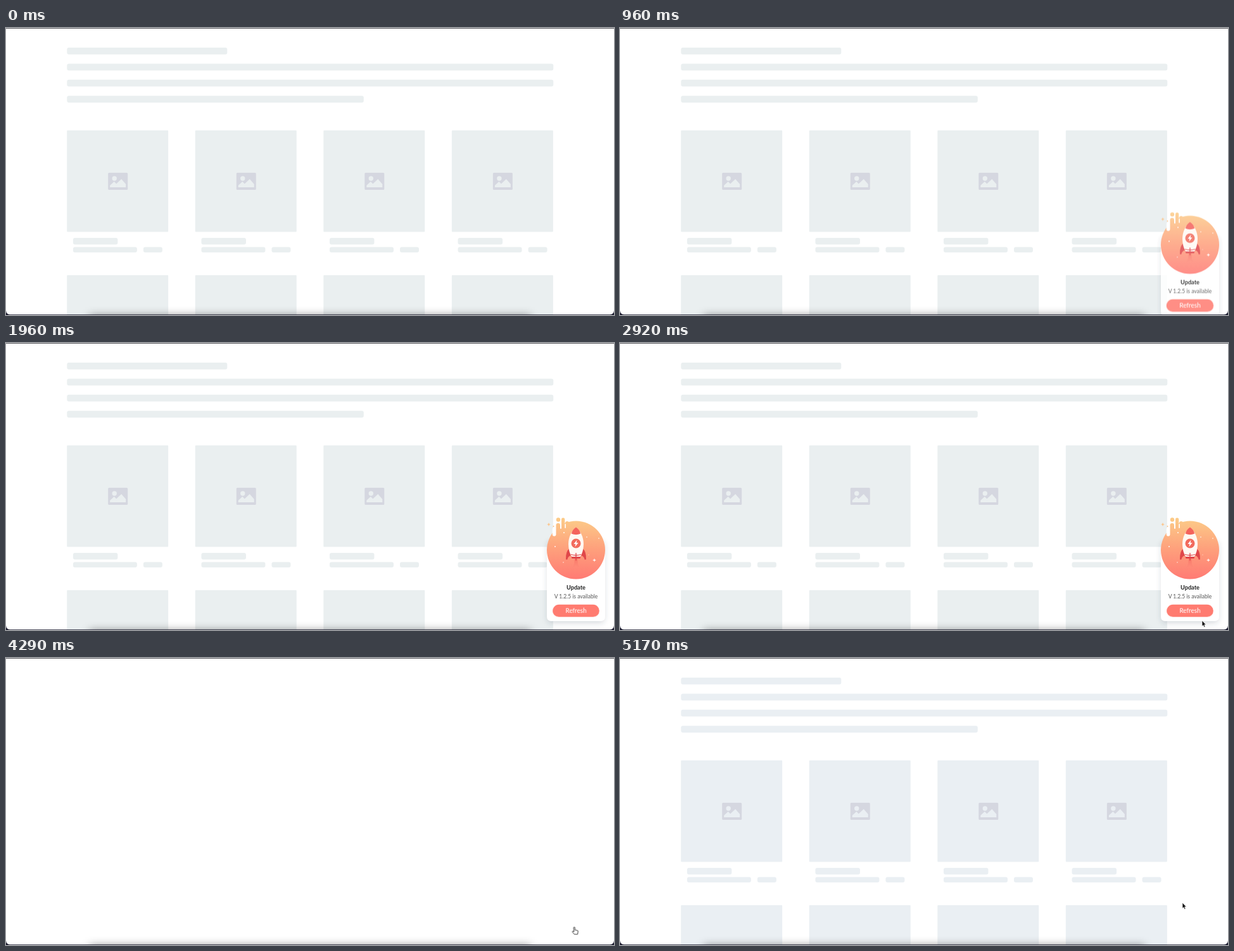
Recreate the animation shown at these times as an HTML page. Size 960 by 454 pixels, loop 5630 ms.

```html
<!DOCTYPE html>
<html lang="en">
<head>
<meta charset="utf-8">
<title>Update prompt</title>
<style>
  html, body { margin: 0; width: 100%; height: 100%; overflow: hidden; background: #fff; }
  svg { display: block; width: 960px; height: 454px; }
  text { font-family: Lato, "Open Sans", sans-serif; text-anchor: middle; }
  #button { transform-origin: 900px 423.5px; }
</style>
</head>
<body>
<svg viewBox="0 0 960 454">
  <defs>
    <linearGradient id="sunset" gradientUnits="userSpaceOnUse" x1="0" y1="278" x2="0" y2="373">
      <stop offset="0" stop-color="#fccb88"/>
      <stop offset=".5" stop-color="#fea07c"/>
      <stop offset="1" stop-color="#ff7b74"/>
    </linearGradient>
    <linearGradient id="flame" x1="0" y1="0" x2="0" y2="1">
      <stop offset="0" stop-color="#f0544f"/>
      <stop offset="1" stop-color="#ff8f80" stop-opacity=".2"/>
    </linearGradient>
    <filter id="soft" x="-20%" y="-200%" width="140%" height="500%"><feGaussianBlur stdDeviation="7"/></filter>
    <filter id="lift" x="-30%" y="-30%" width="160%" height="160%"><feGaussianBlur stdDeviation="4"/></filter>
    <g id="picture">
      <rect x="65" y="67" width="31" height="27" rx="1.5" fill="#d5d7e0"/>
      <circle cx="75" cy="76" r="3.7"/>
      <path d="M68 90V87L74.5 81 78 84.5 86 77 93 85V90Z"/>
    </g>
  </defs>

  <rect width="960" height="454" fill="#fff"/>
  <g id="skeleton"></g>
  <rect x="132" y="455" width="696" height="22" fill="#000" fill-opacity=".48" filter="url(#soft)"/>

  <g id="card">
    <rect x="855" y="314" width="90" height="129" rx="7" fill="#3c4654" fill-opacity=".2" filter="url(#lift)"/>
    <path d="M854 327H946V433Q946 440 939 440H861Q854 440 854 433Z" fill="#fff"/>

    <g fill="url(#sunset)">
      <circle cx="900" cy="327.5" r="46"/>
      <circle cx="872" cy="279.5" r="3.2"/>
      <rect x="868.5" y="285" width="6.5" height="18" rx="3.2"/>
      <rect x="877" y="276.5" width="5.3" height="24" rx="2.6"/>
      <rect x="883" y="282" width="6" height="16" rx="3"/>
      <path d="M857 284L857.8 286.2 860 287 857.8 287.8 857 290 856.2 287.8 854 287 856.2 286.2Z"/>
      <circle cx="864.5" cy="290" r="1"/>
    </g>
    <g fill="#fff">
      <rect x="862.8" y="292" width="5.7" height="13.5" rx="2.8"/>
      <rect x="875" y="283" width="2" height="11" rx="1"/>
      <rect x="882.3" y="286" width="1.6" height="7" rx=".8"/>
    </g>
    <g id="stars" fill="#fff"></g>

    <path d="M898 340H902L903 350 907 358 900 352 893 358 897 350Z" fill="url(#flame)" opacity=".55"/>
    <g fill="#e0474a">
      <path id="fin" d="M890 325Q883.5 329 884 342.5H886.5Q887 337.5 892 336Z"/>
      <use href="#fin" transform="matrix(-1 0 0 1 1800 0)"/>
      <path d="M892 335H908L906.5 341H893.5Z"/>
    </g>
    <path d="M900 292C907 297 912 307 912 318Q912 329 907 338H893Q888 329 888 318C888 307 893 297 900 292Z" fill="#fff8f2"/>
    <path d="M900 291.5Q905.5 295 907.3 301.5Q900 305 892.7 301.5Q894.5 295 900 291.5Z" fill="#f4625c"/>
    <circle cx="900" cy="317" r="7.5" fill="#f26b5c"/>
    <path d="M901.6 311.5L896.4 318H899.4L898.4 322.5 903.6 316H900.6Z" fill="#fff"/>
    <path d="M892 334.5Q900 337 908 334.5M900 332V344" stroke="#e0474a" stroke-width="1.3" fill="none"/>

    <text x="900" y="390" font-size="9.2" font-weight="700" fill="#222">Update</text>
    <text x="900" y="404" font-size="8.5" fill="#555">V 1.2.5 is available</text>
    <g id="button">
      <rect x="863" y="413.8" width="74" height="19.6" rx="9.8" fill="#ff7b70"/>
      <text x="900" y="427" font-size="10" font-weight="500" fill="#fff">Refresh</text>
    </g>
  </g>

  <g id="cursor" stroke-linejoin="round">
    <path id="arrow" d="M0 0V9.2L2 7.4 3.4 10.4 5 9.7 3.6 6.8H6.3Z" fill="#111" stroke="#fff" stroke-width=".7"/>
    <path id="hand" d="M-1.1 1A1.1 1.1 0 0 1 1.1 1V4.4L5 5.2Q6.2 5.6 6 7L5.2 11.2H0L-3 7.6Q-3.4 6.4 -2.2 6.2L-.4 7.2Z" fill="#fff" stroke="#222" stroke-width=".9"/>
  </g>

  <rect width="960" height="1" fill="#5c5c60"/>
  <path d="M0 447Q0.5 453 6 453.2H954Q959.5 453 960 447V454H0Z" fill="#1c1c30"/>
</svg>
<script>
const LOOP = 5630;
const HOLD = 'steps(1, end)';
const SINE = 'cubic-bezier(.37, 0, .63, 1)';
const byId = id => document.getElementById(id);

const bar = (x, y, w, h, r = 3) =>
  `<rect x="${x}" y="${y}" width="${w}" height="${h}" rx="${r}"/>`;

const lines = [253, 768, 768, 468.5].map((w, i) => bar(96.3, 31 + i * 25.4, w, 10.8));
const tiles = [0, 1, 2, 3].map(i => `<g transform="translate(${96.2 + i * 202.55} 162)">
  ${bar(0, 0, 160, 160.4, 1)}<use href="#picture"/>
  ${bar(9.7, 170, 70.5, 10.6)}${bar(9.7, 184.5, 101, 8.6)}${bar(120.7, 184.5, 30, 8.6)}
  ${bar(0, 229, 160, 70, 1)}</g>`);
byId('skeleton').innerHTML = lines.concat(tiles).join('');

const stars = [[881, 300, .9], [917, 307, .8], [936, 309, .8], [867, 322, .9], [880, 347, .7], [920, 335, .5]];
byId('stars').innerHTML =
  stars.map(([x, y, r]) => `<circle cx="${x}" cy="${y}" r="${r}"/>`).join('') +
  '<path d="M929 340.5L929.7 342.8 932 343.5 929.7 344.2 929 346.5 928.3 344.2 926 343.5 928.3 342.8Z"/>';

// Each row: time in ms, properties, easing towards the next row.
function play(id, rows) {
  const frames = rows.map(([ms, props, easing = 'linear']) => ({ offset: ms / LOOP, easing, ...props }));
  byId(id).animate(frames, { duration: LOOP, iterations: Infinity });
}
const at = (x, y) => ({ transform: `translate(${x}px, ${y}px)` });
const rise = (y, opacity) => ({ ...at(0, y), opacity });
const scale = s => ({ transform: `scale(${s})` });
const show = opacity => ({ opacity });

play('skeleton', [
  [0, { fill: '#eaeff0', opacity: 1 }, HOLD],
  [4290, { fill: '#eaeff3', opacity: 0 }, HOLD],
  [4500, { fill: '#eaeff3', opacity: 1 }, HOLD],
  [LOOP, { fill: '#eaeff3', opacity: 1 }],
]);

play('card', [
  [0, rise(105, 0), HOLD],
  [500, rise(94, .1)],
  [670, rise(57, .48)],
  [800, rise(34, .68)],
  [920, rise(19, .82)],
  [1040, rise(8.5, .92)],
  [1210, rise(2, .98)],
  [1400, rise(0, 1), HOLD],
  [4290, rise(0, 0), HOLD],
  [LOOP, rise(0, 0)],
]);

play('button', [
  [0, scale(.919)],
  [440, scale(.919), SINE],
  [1440, scale(1.081), SINE],
  [2440, scale(.919), SINE],
  [3440, scale(1.081), SINE],
  [4440, scale(.919)],
  [LOOP, scale(.919)],
]);

play('cursor', [
  [0, at(924, 470), HOLD],
  [2660, at(924, 456), 'ease-out'],
  [2800, at(919, 439)],
  [2960, at(919, 439), 'ease-in-out'],
  [3400, at(897.3, 425.8)],
  [4710, at(897.3, 425.8), 'ease-in-out'],
  [5170, at(888, 387)],
  [LOOP, at(888, 387)],
]);
play('arrow', [[0, show(1), HOLD], [3140, show(0), HOLD], [4750, show(1), HOLD], [LOOP, show(1)]]);
play('hand', [[0, show(0), HOLD], [3140, show(1), HOLD], [4750, show(0), HOLD], [LOOP, show(0)]]);
</script>
</body>
</html>
```
